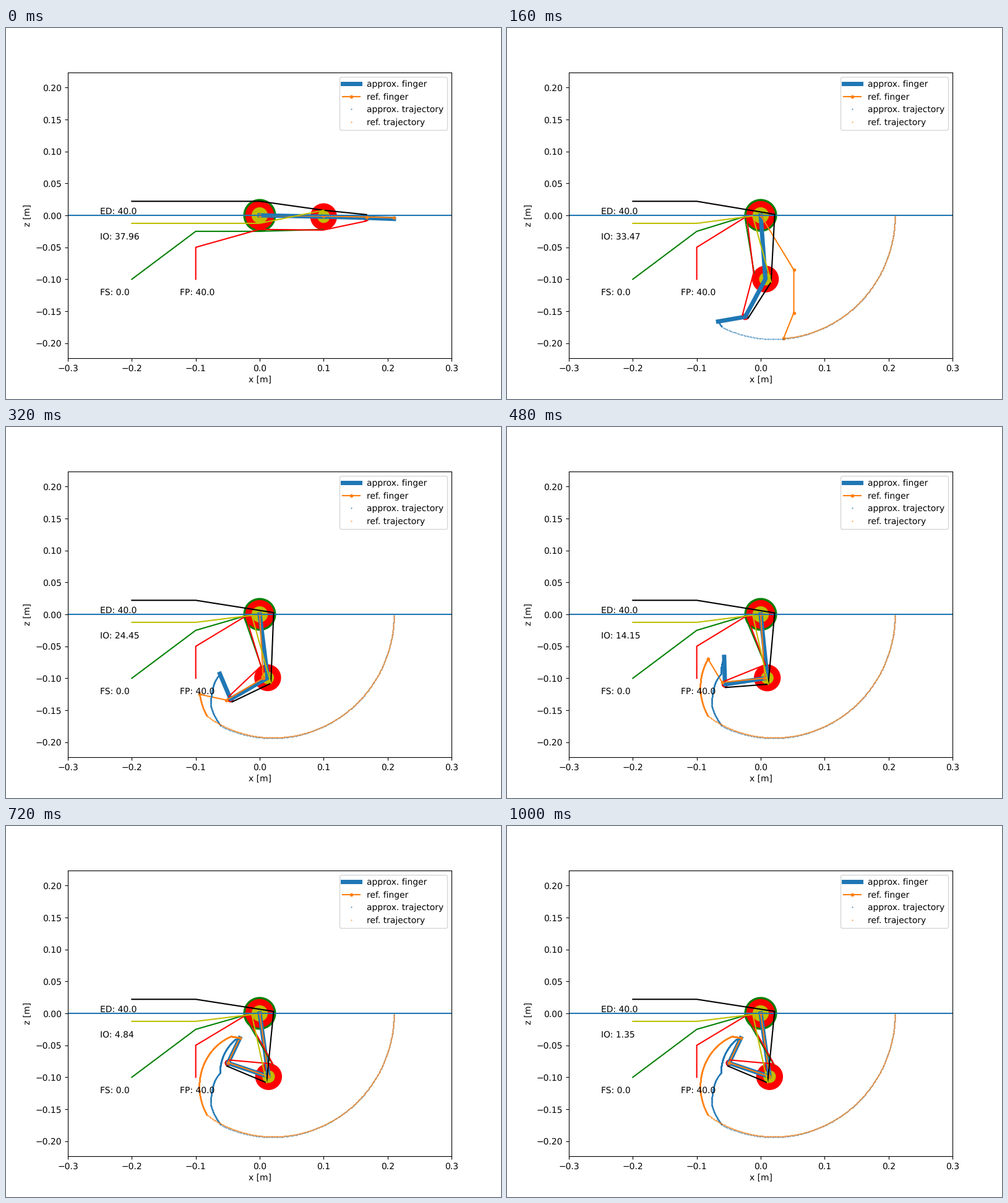
These frames come from a looping animation (800x600 px, 1040 ms). A matplotlib script:

```python
import numpy as np
import matplotlib.pyplot as plt
from matplotlib.animation import FuncAnimation

plt.rcParams["text.hinting"] = "none"

FRAMES, INTERVAL = 26, 40
STEP, LEAD = 1, 2  # trajectory sampling and head start in ms
LINKS = np.array([0.1, 0.067, 0.043])

# (ms, degrees) knots of each joint's flexion; every joint stops at its limit
APPROX = (
    [(0, 0), (145, 85.5), (200, 86.3), (320, 82.8), (640, 85.3), (720, 82)],
    [(0, 0), (160, 32), (320, 67), (480, 87), (640, 112), (720, 116.5)],
    [(0, 0), (240, 77), (290, 87), (320, 97)],
)
REF = (
    [(0, 0), (240, 87), (640, 86), (720, 82)],
    [(0, 0), (320, 62), (640, 113.4), (720, 117)],
    [(0, 0), (720, 96.3)],
)
IO_FORCE = [(0, 37.96), (160, 33.47), (320, 24.45), (480, 14.15),
            (640, 7.03), (720, 4.84), (1000, 1.35)]


def angles(finger, t):
    """Absolute link angles, clockwise from the x axis."""
    flexion = [np.interp(t + LEAD, *zip(*knots)) for knots in finger]
    return np.radians(np.cumsum(flexion, axis=0))


def joints(a):
    """Positions of base, both joints and tip: shape (2, 4, ...)."""
    lengths = LINKS.reshape((3,) + (1,) * (a.ndim - 1))
    links = lengths * np.array([np.cos(a), -np.sin(a)])
    return np.concatenate([np.zeros_like(links[:, :1]), np.cumsum(links, axis=1)], axis=1)


times = np.arange(-LEAD, FRAMES * INTERVAL, STEP)
approx_path = joints(angles(APPROX, times))[:, 3]
ref_path = joints(angles(REF, times))[:, 3]

fig = plt.figure(figsize=(8, 6), dpi=100)
ax = fig.add_axes([0.125, 0.11, 0.775, 0.77])
ax.set(xlim=(-0.3, 0.3), ylim=(-0.22355, 0.22355), xlabel="x [m]", ylabel="z [m]")


def disc(r, color):
    return ax.add_patch(plt.Circle((0, 0), r, color=color, lw=1))


for r, c in ((0.025, "g"), (0.0218, "r"), (0.012, "y")):
    disc(r, c)
mid_discs = [disc(r, c) for r, c in ((0.0203, "r"), (0.0092, "y"))]
end_disc = disc(0.0045, "r")

# fixed guide points, then signed offsets at the joints
TENDONS = {
    "g": ([(-0.2, -0.1), (-0.1, -0.025)], (-0.025, -0.02)),
    "r": ([(-0.1, -0.1), (-0.1, -0.05)], (-0.022, -0.021, -0.005)),
    "k": ([(-0.2, 0.022), (-0.1, 0.022)], (0.022, 0.01, 0.005)),
    "y": ([(-0.2, -0.0125), (-0.1, -0.0125)], (-0.0125, 0.01)),
}

approx_line, = ax.plot([], [], color="C0", lw=5, label="approx. finger")
ref_line, = ax.plot([], [], ".-", color="C1", label="ref. finger")
approx_dots, = ax.plot([], [], ".", color="C0", ms=0.9, label="approx. trajectory")
ref_dots, = ax.plot([], [], ".", color="C1", ms=0.9, label="ref. trajectory")
ax.axhline(0, color="C0")
tendon_lines = {c: ax.plot([], [], c)[0] for c in TENDONS}

ax.text(-0.25, 0.0025, "ED: 40.0")
ax.text(-0.25, -0.125, "FS: 0.0")
ax.text(-0.125, -0.125, "FP: 40.0")
io_text = ax.text(-0.25, -0.0375, "")
ax.legend(loc="upper right")


def update(i):
    t = i * INTERVAL
    a = angles(APPROX, t)
    pts = joints(a)
    approx_line.set_data(*pts)
    ref_line.set_data(*joints(angles(REF, t)))

    n = (t + LEAD) // STEP + 1
    approx_dots.set_data(*approx_path[:, :n])
    ref_dots.set_data(*ref_path[:, :n])

    for d in mid_discs:
        d.center = pts[:, 1]
    end_disc.center = pts[:, 2]

    # the last joint shares its tendon direction with the middle link
    b = a[[0, 1, 1]]
    normals = np.array([np.sin(b), np.cos(b)])
    for c, (guides, offsets) in TENDONS.items():
        via = [pts[:, j] + r * normals[:, j] for j, r in enumerate(offsets)]
        tendon_lines[c].set_data(*np.array(guides + via).T)

    ms, force = zip(*IO_FORCE)
    io = float(np.exp(np.interp(t, ms, np.log(force))))
    io_text.set_text(f"IO: {round(io, 2)}")


anim = FuncAnimation(fig, update, frames=FRAMES, interval=INTERVAL, repeat=True,
                     repeat_delay=0, blit=False)
plt.show()
```
